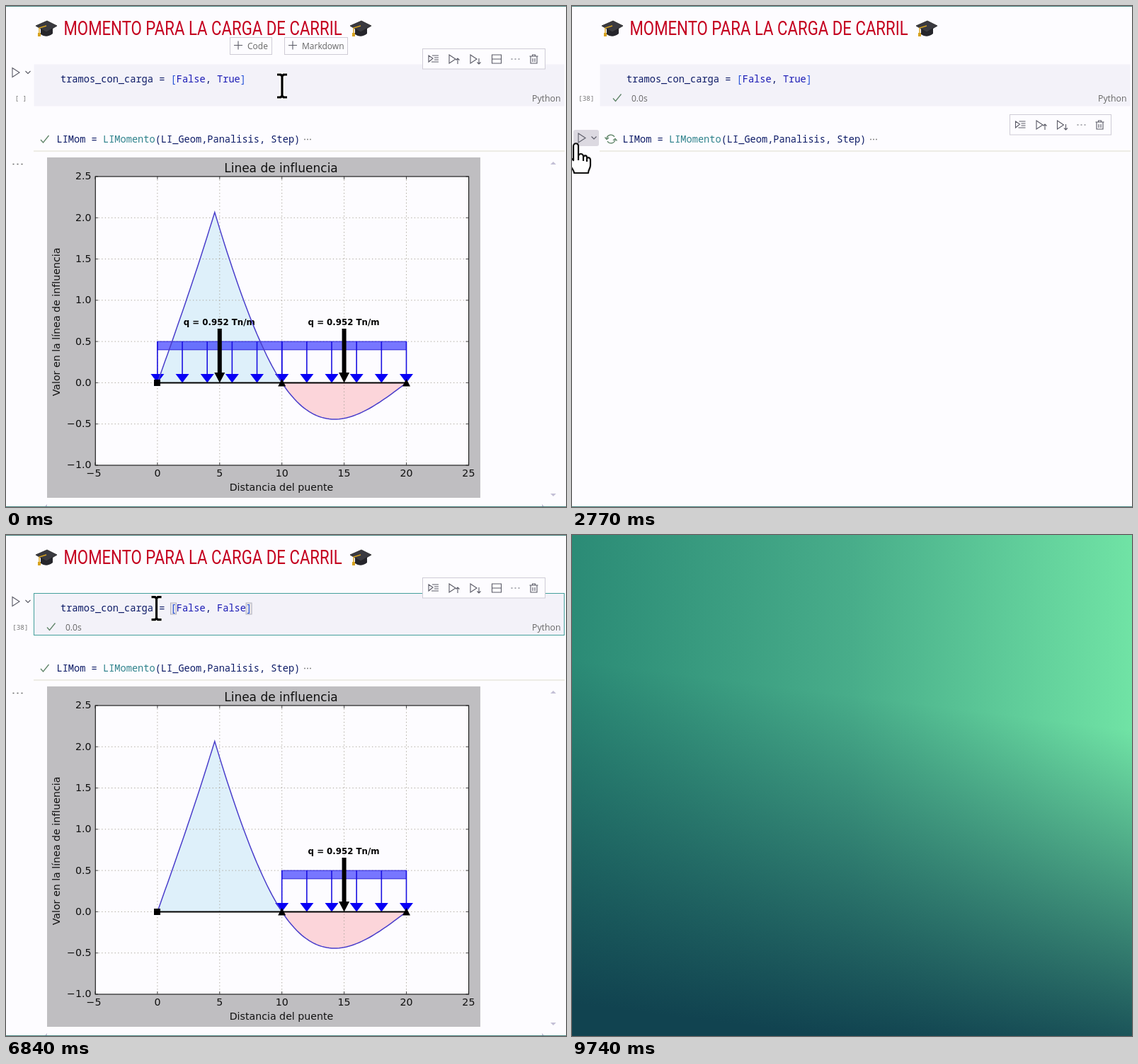
These frames come from a looping animation (791x708 px, 9780 ms). An HTML page:

```html
<!DOCTYPE html>
<html lang="es">
<head>
<meta charset="utf-8">
<title>Momento para la carga de carril</title>
<style>
html, body { margin: 0; width: 100%; height: 100%; overflow: hidden; background: #fdfcff; }
svg { display: block; position: absolute; left: 0; top: 0; }
text { white-space: pre; }
.ui { font: 12px "Open Sans", "Noto Sans", sans-serif; fill: #666; }
.code { font: 13.65px "Noto Sans Mono", "DejaVu Sans Mono", monospace; fill: #0c1a66; }
.count { font: 9.4px "Noto Sans Mono", "DejaVu Sans Mono", monospace; fill: #777; }
.plot { font: 14.2px "DejaVu Sans", sans-serif; fill: #111; }
.load { font: bold 11.8px "DejaVu Sans", sans-serif; fill: #000; text-anchor: middle; }
.icon { fill: none; stroke: #5a5a66; stroke-width: 1.1; }
.tick { fill: none; stroke: #5f8468; stroke-width: 1.3; }
.box { fill: #fdfcff; stroke: #cfccd6; }
.kw { fill: #1b1bb5; }
.br { fill: #2450d8; }
</style>
</head>
<body>
<svg id="stage" width="791" height="708" viewBox="0 0 791 708">
  <defs>
    <linearGradient id="glow"><stop stop-color="#2b8b76"/><stop offset=".5" stop-color="#48ad8a"/><stop offset="1" stop-color="#70e3a5"/></linearGradient>
    <linearGradient id="deep" gradientUnits="userSpaceOnUse" x1="425" y1="230" x2="365" y2="708"><stop stop-color="#114350" stop-opacity="0"/><stop offset="1" stop-color="#114350"/></linearGradient>
    <g id="cap">
      <path d="M49 31V40Q57 46 66 39V30Z" fill="#25252b"/>
      <path d="M42 28L58 21L72 28L57 37Z" fill="#3a3a40" stroke="#222" stroke-width=".8"/>
      <path d="M57 28L47 31V40" fill="none" stroke="#d6a21f" stroke-width="1.4"/>
      <path d="M45 38H49V43H45Z" fill="#d6a21f"/>
    </g>
    <g id="run" class="icon"><path d="M-4.500-6.500L5.500 0L-4.500 6.500Z"/><path d="M14-2L17.500 1.500L21-2"/></g>
    <g id="sync" class="tick"><path d="M-6-1A6 6 0 0 1 5-3M6 1A6 6 0 0 1-5 3"/><path d="M-8.500-2.500L-6 .5L-3-2M8.500 2.500L6-.5L3 2"/></g>
    <path id="check" class="tick" d="M-5.500 1L-2 5L6-5"/>
  </defs>

  <rect width="791" height="708" fill="#fdfcff"/>
  <use href="#cap"/><use href="#cap" x="444"/>
  <text transform="translate(81.500 41) scale(.793 1)" font-family="Roboto, sans-serif" font-size="28" fill="#c4001f">MOMENTO PARA LA CARGA DE CARRIL</text>

  <g id="insert" class="ui">
    <rect class="box" x="316.500" y="44.500" width="59" height="24"/><rect class="box" x="393.500" y="44.500" width="89" height="24"/>
    <path class="icon" d="M322 55.500H334M328 49.500V61.500M399 55.500H411M405 49.500V61.500"/>
    <text x="341" y="61">Code</text><text x="418" y="61">Markdown</text>
  </g>

  <rect id="cell" x="39.500" y="82.500" width="749" height="59" fill="#f3f2f9"/>
  <rect id="hover1" x="2" y="83" width="36" height="22" rx="3" fill="#dcd9e1"/>
  <use id="run1" href="#run" x="13.500" y="94"/>
  <text id="count" class="count" x="9" y="134"></text>
  <use id="check1" href="#check" x="63.500" y="129.500"/>
  <use id="sync1" href="#sync" x="64.500" y="129.500"/>
  <text id="time" class="ui" x="84" y="135">0.0s</text>
  <text class="ui" x="743" y="135" style="font-size:12.300px">Python</text>
  <g id="bulb"><circle cx="49.500" cy="100" r="4.700"/><path d="M47.500 103H51.500V109H47.500Z"/></g>
  <rect id="pick" y="95" height="17" fill="#a3bdeb"/>
  <g id="match" fill="#e4e2ea" stroke="#b5b5bd"><rect x="232.500" y="96" width="8" height="16"/><rect id="close" y="96" width="8" height="16"/></g>
  <text class="code" x="77" y="108">tramos_con_carga = <tspan class="br">[</tspan><tspan class="kw">False</tspan>, <tspan class="kw" id="word"></tspan><tspan class="br">]</tspan></text>

  <rect id="hover2" x="2" y="175" width="36" height="23" rx="3" fill="#dcd9e1"/>
  <use id="run2" href="#run" x="13.500" y="186.500"/>
  <use id="check2" href="#check" x="54.500" y="188"/>
  <use id="sync2" href="#sync" x="55" y="188"/>
  <text class="code" x="71.500" y="193">LIMom = <tspan fill="#2f828c">LIMomento</tspan>(LI_Geom,Panalisis, Step)</text>
  <path d="M421 188.500h2m2 0h2m2 0h2" stroke="#888" stroke-width="1.500"/>
  <path d="M39 205H789" stroke="#dedccb"/>

  <g id="output">
    <path d="M9.500 223.500h2m4 0h2m4 0h2" stroke="#666" stroke-width="1.600"/>
    <path d="M769 224L773 220L777 224ZM769 689L773 693L777 689ZM54 708L58 704V708ZM757 704L761 708H757Z" fill="#c3bfd6"/>
    <g id="chart"></g>
  </g>

  <g id="bar1"></g><g id="bar2"></g>
  <g id="menu"></g>
  <path d="M0 .5H791M0 707.500H791" stroke="#4d8583"/>

  <g id="beam" fill="none">
    <path id="beamPath" d="M-7-16H-2L0-14L2-16H7M0-14V14M-7 16H-2L0 14L2 16H7" stroke="#fff" stroke-width="6.500"/>
    <path d="M-7-16H-2L0-14L2-16H7M0-14V14M-7 16H-2L0 14L2 16H7" stroke="#000" stroke-width="3.200"/>
  </g>
  <path id="hand" fill="#fff" stroke="#111" stroke-width="2.200" stroke-linejoin="round" d="M-4 4C-4-1 3-1 3 4V18C4 14 9 14 10 18V20C11 16 15 17 15 20V22C16 19 20 20 20 24V31C20 36 17 37 17 42H-3C-3 37-11 31-11 24C-11 20-7 20-4 24ZM3 18V24M10 20V25M15 22V26"/>
  <g id="ending"><rect width="791" height="708" fill="url(#glow)"/><rect width="791" height="708" fill="url(#deep)"/></g>
</svg>
<script>
const LOOP = 9780, CHAR = 8.19;
const $ = id => document.getElementById(id);
const show = (id, on) => $(id).style.display = on ? "" : "none";
const within = (t, a, b) => t >= a && t < b;

// chart coordinates
const px = x => 213.9 + x * 17.58;
const py = y => 532.4 - y * 116.57;

// influence of a unit load on the moment at `cut` in a two-span beam
const SPAN = 10, CUT = 4.6;
function influence(x) {
  const s = x <= SPAN ? x : 2 * SPAN - x;
  const support = s * (SPAN * SPAN - s * s) / (4 * SPAN * SPAN);
  const simple = x > SPAN ? 0 : x < CUT ? x * (SPAN - CUT) / SPAN : CUT * (SPAN - x) / SPAN;
  return simple - support * CUT / SPAN;
}

function curve(from, to) {
  let d = "";
  for (let x = from; x <= to + 1e-6; x += 0.2)
    d += (d ? "L" : "M") + px(x).toFixed(1) + " " + py(influence(x)).toFixed(1);
  return d;
}

function loadSpan(id, from) {
  const a = px(from), mid = px(from + 5), top = py(0.5), base = py(0);
  let s = `<g id="${id}"><rect x="${a}" y="${top}" width="${10 * 17.58}" height="11.7" fill="#00f" fill-opacity=".53" stroke="#2a20d8"/>`;
  for (let i = 0; i <= 10; i += 2) {
    const x = px(from + i);
    s += `<path d="M${x} ${top}V522" stroke="#1a10e0" stroke-width="1.6"/><path d="M${x - 9.5} 520H${x + 9.5}L${x} ${base}Z" fill="#0800f5"/>`;
  }
  return s + `<path d="M${mid - 3} 456H${mid + 3}V518H${mid + 7.5}L${mid} ${base}L${mid - 7.5} 518H${mid - 3}Z"/>
    <text class="load" x="${mid - .5}" y="451">q = 0.952 Tn/m</text></g>`;
}

function buildChart() {
  let grid = "", ticks = "", labels = "";
  const num = s => String(s).replace("-", "\u2212");
  for (let x = -5; x <= 25; x += 5) {
    const X = px(x);
    if (x > -5 && x < 25) grid += `M${X} 241V649`;
    ticks += `M${X} 241v4M${X} 649v-4`;
    labels += `<text x="${X - (x < 0 ? 2 : 0)}" y="665" text-anchor="middle">${num(x)}</text>`;
  }
  for (let y = -1; y <= 2.5; y += 0.5) {
    const Y = py(y);
    if (y > -1 && y < 2.5) grid += `M126 ${Y}H653`;
    ticks += `M126 ${Y}h4M653.5 ${Y}h-4`;
    labels += `<text x="120.500" y="${Y + 4.5}" text-anchor="end">${num(y.toFixed(1))}</text>`;
  }
  const prop = x => `<path d="M${px(x) - 5.5} 537.500H${px(x) + 5.5}L${px(x)} 527Z"/>`;
  $("chart").innerHTML = `
    <rect x="58" y="214" width="612" height="481" fill="#bfbec1"/>
    <rect x="126" y="241" width="527.5" height="408" fill="#fdfcff"/>
    <path d="${curve(0, 10)}Z" fill="#def0fa"/><path d="${curve(10, 20)}Z" fill="#fcd5da"/>
    <path d="${grid}" stroke="#aaa59a" stroke-dasharray="1.300 3.300"/>
    ${loadSpan("load1", 0)}${loadSpan("load2", 10)}
    <path d="${curve(0, 20)}" fill="none" stroke="#4a3ecb" stroke-width="1.500"/>
    <path d="M${px(0)} 532.400H${px(20)}" stroke="#000" stroke-width="2"/>
    <rect x="209" y="528" width="9" height="9"/>${prop(10)}${prop(20)}
    <path d="${ticks}" stroke="#222" stroke-width=".8"/>
    <rect x="126.300" y="241" width="527.3" height="408" fill="none" stroke="#222" stroke-width="1.200"/>
    <g class="plot">${labels}
      <text x="388.500" y="235" text-anchor="middle" style="font-size:17px">Linea de influencia</text>
      <text x="389" y="685" text-anchor="middle">Distancia del puente</text>
      <text transform="translate(76 446.500) rotate(-90)" text-anchor="middle">Valor en la línea de influencia</text>
    </g>`;
}

const ICONS = {
  line: "M-7-5L-1-1L-7 4ZM-2-5H7M1-2H7M1 1H7M-3 4H7",
  above: "M-7-6L2 0L-7 6ZM5 7V-1M2.500 1.500L5-1L7.500 1.500",
  below: "M-7-6L2 0L-7 6ZM5-1V7M2.500 4.500L5 7L7.500 4.500",
  split: "M-6.500-6H6.500V6H-6.500ZM-6.500 0H6.500",
  dots: "M-6 0h2M-1 0h2M4 0h2",
  bin: "M-6-4H6M-2-4V-6H2V-4M-4.500-4V6H4.500V-4M-1.500-1V4M1.500-1V4"
};
function buildBar(id, x, y, icons) {
  $(id).innerHTML = `<rect class="box" x="${x}" y="${y}" width="${761.5 - x}" height="28.5"/>` +
    icons.map(([name, cx]) => `<path class="icon" transform="translate(${cx} ${y + 14.5})" d="${ICONS[name]}"/>`).join("");
}

function buildMenu() {
  const items = "False FileExistsError FileLink FileLinks FileNotFoundError FloatingPointError FloatSlider FutureWarning finally for from filter".split(" ");
  const keywords = ["False", "finally", "for", "from"];
  let s = `<rect x="307.500" y="115.500" width="458" height="245" fill="#f5f4fa" stroke="#cbc8d2"/>
    <rect x="307" y="115" width="459" height="20.500" fill="#0762b3"/>
    <rect x="754.500" y="136" width="11" height="127" fill="#c5c2ca"/>`;
  items.forEach((name, i) => {
    const y = 125 + i * 20.27, first = i === 0;
    s += keywords.includes(name)
      ? `<path d="M311 ${y - 4}h5m2 0h7M311 ${y}h8m2 0h4M311 ${y + 4}h4m2 0h8" stroke="${first ? "#e8eefa" : "#666"}" stroke-width="1.400"/>`
      : `<path transform="translate(318 ${y})" d="M-6-1L-2-5L1-2L-3 2ZM0 0H4M1 0V4H4M4-1L6-3L8-1L6 1ZM4 4L6 2L8 4L6 6Z" fill="none" stroke="#cf8a2a" stroke-width="1.200"/>`;
    s += `<text class="code" x="331.500" y="${y + 4.7}" style="fill:${first ? "#fff" : "#333"}"><tspan font-weight="700" fill="${first ? "#cfe6ff" : "#0762b3"}">${name[0]}</tspan>${name.slice(1)}</text>`;
  });
  $("menu").innerHTML = s;
}

// pointer stops: time, x, y
const STOPS = [
  [0, 390, 113], [150, 390, 113], [750, 6, 93], [1300, 6, 93], [1750, 6, 194], [2900, 6, 194],
  [3500, 262, 104], [3820, 262, 104], [4040, 299, 103], [4250, 306, 109], [6600, 306, 109],
  [7250, 5, 92], [8000, 5, 92], [8350, 12, 184], [LOOP, 12, 184]
];
function pointer(t) {
  let i = 0;
  while (i < STOPS.length - 2 && STOPS[i + 1][0] <= t) i++;
  const [t0, x0, y0] = STOPS[i], [t1, x1, y1] = STOPS[i + 1];
  const u = (t - t0) / (t1 - t0), e = u * u * (3 - 2 * u);
  return [x0 + (x1 - x0) * e, y0 + (y1 - y0) * e];
}

function update(t) {
  const [x, y] = pointer(t), onEdge = x < 39;
  show("hand", onEdge);
  show("beam", !onEdge);
  $(onEdge ? "hand" : "beam").setAttribute("transform", `translate(${x} ${y})`);

  const second = within(t, 2130, 3250) || t >= 8420;
  const over1 = onEdge && y < 142, over2 = onEdge && y > 160;
  show("bar1", !second);
  show("bar2", second);
  show("run1", !second || over1);
  show("run2", second || over2);
  show("hover1", over1);
  show("hover2", over2);
  show("insert", t < 450);

  const busy1 = within(t, 1000, 1180) || within(t, 7600, 7900);
  const fresh = t < 1000;
  $("count").textContent = fresh ? "[ ]" : t < 7600 ? "[38]" : "[40]";
  $("count").setAttribute("x", fresh ? 12.5 : 9);
  show("check1", !fresh && !busy1);
  show("sync1", busy1);
  show("time", !fresh);

  const word = t < 5100 ? "True" : t < 5700 ? "" : t < 6450 ? "F" : "False";
  $("word").textContent = word;
  const focus = within(t, 3600, 7500);
  $("cell").setAttribute("stroke", focus ? "#45a09c" : "none");
  show("bulb", within(t, 3850, 5100));
  const first = t < 4350;
  show("pick", within(t, 3780, 5100));
  $("pick").setAttribute("x", 77 + CHAR * (first ? 20 : 27));
  $("pick").setAttribute("width", CHAR * (first ? 5 : 4));
  show("match", within(t, 5100, 7500));
  $("close").setAttribute("x", 77 + CHAR * (27 + word.length));
  show("menu", within(t, 5760, 6450));

  const busy2 = within(t, 2180, 2850) || within(t, 8450, 9150);
  show("check2", !busy2);
  show("sync2", busy2);
  show("output", !busy2);
  show("load1", t < 2180);
  show("load2", t < 8450);
  show("ending", t >= 9660);
}

buildChart();
buildMenu();
buildBar("bar1", 588.5, 60.5, [["line", 604], ["above", 633], ["below", 663], ["split", 693], ["dots", 719.5], ["bin", 745.5]]);
buildBar("bar2", 618.5, 153.5, [["line", 633.5], ["above", 663], ["below", 692.5], ["dots", 719.5], ["bin", 745.5]]);

const start = performance.now();
function frame() {
  update((performance.now() - start) % LOOP);
  requestAnimationFrame(frame);
}
frame();
</script>
</body>
</html>
```
